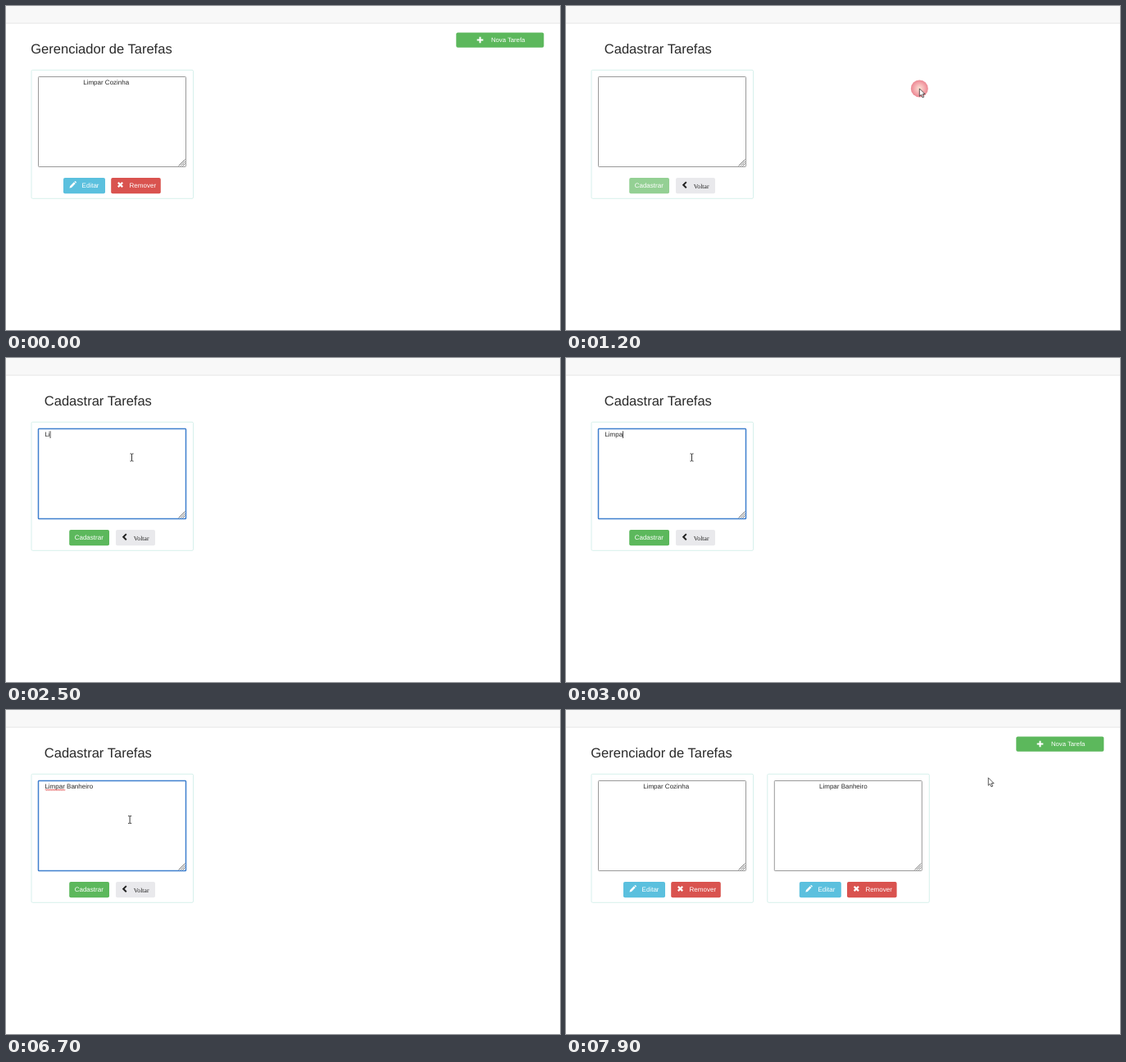
An HTML page that plays this animation: 676 px wide and 396 px high, repeating every 8000 ms.

```html
<!DOCTYPE html>
<html lang="pt">
<head>
<meta charset="utf-8">
<title>Gerenciador de Tarefas</title>
<style>
html, body { margin: 0; width: 100%; height: 100%; overflow: hidden; background: #fff; }
svg { display: block; width: 676px; height: 396px; }
text { font: 8px "Liberation Sans", Arial, sans-serif; fill: #2a2a2a; white-space: pre; text-rendering: geometricPrecision; }
text.title { font-size: 16.55px; }
text.serif { font-family: "Liberation Serif", "Times New Roman", serif; font-size: 7.7px; fill: #222; }
text.light { fill: #fff; }
text.small { font-size: 7.7px; }
</style>
</head>
<body>
<svg id="stage" viewBox="0 0 676 396">
  <defs>
    <radialGradient id="glow">
      <stop offset="0" stop-color="#fce3d4"/>
      <stop offset=".5" stop-color="#f6b4b6"/>
      <stop offset="1" stop-color="#ec8792"/>
    </radialGradient>
    <path id="resizer" d="M210.5 195.5L218.5 187.5M213 195.5L218.5 190M215.5 195.5L218.5 192.5" stroke="#777" stroke-width="1"/>
  </defs>
  <rect width="676" height="396" fill="#fff"/>
  <rect width="676" height="21" fill="#f8f8f8"/>
  <rect y="20.6" width="676" height="1" fill="#e7e7e7"/>
  <g id="list"></g>
  <g id="form"></g>
  <circle id="halo" r="10.5" fill="url(#glow)"/>
  <g id="pointer">
    <path id="arrow" d="M0 0V9.4L2.2 7.4L3.7 11L5.4 10.3L3.9 6.8H6.8Z" fill="#fff" stroke="#222" stroke-width=".75"/>
    <path id="beam" d="M-2-4.5H-.6L0-4L.6-4.5H2M0-4V4M-2 4.5H-.6L0 4L.6 4.5H2" fill="none" stroke="#222" stroke-width=".9"/>
    <path id="hand" d="M-1 0Q0-1.2 1 0V4.2L5.4 5.2Q6.4 5.6 6.2 6.8L5.4 11H.2L-3.4 6.8Q-3.4 5.4-2.2 5.8L-1 7Z" fill="#fff" stroke="#111" stroke-width=".8"/>
  </g>
</svg>
<script>
const LOOP = 8000, STEP = 100;
const TASK = 'Limpar Banheiro';
const TEXT_X = 47.4;
const GREEN = '#5cb85c', GREEN_HOVER = '#449d44';

const FORM_OPEN = 1000, FORM_CLOSE = 7200, FOCUS = 1500;
const PACE = 165, BLINK = 500, CLICK_LENGTH = 300;
const CLICKS = [900, FOCUS, 7000];

// typing bursts: each starts after the letters of the one before
const BURSTS = [{ start: 2300, letters: 7 }, { start: 4700, letters: 8 }];
const SPELL = BURSTS[0].start + 7 * PACE;

// pointer moves, each a curve from the end of the one before
const ENTER = [358, 387];
const MOVES = [
  { from: 0, to: 650, end: [150, 178] },
  { from: 650, to: 900, end: [590, 42] },
  { from: 1000, to: 1490, bend: [372, 146.5], end: [153.5, 121.5] },
  { from: 6600, to: 7000, bend: [149, 160], end: [104, 219] },
  { from: 7200, to: 7900, bend: [213, 325], end: [515.3, 82.8] }
];

const $ = id => document.getElementById(id);
const show = (el, on) => el.setAttribute('visibility', on ? 'visible' : 'hidden');
const clamp = (v, lo, hi) => Math.min(hi, Math.max(lo, v));
const smooth = k => k * k * (3 - 2 * k);

function add(parent, tag, attrs, text) {
  const el = document.createElementNS('http://www.w3.org/2000/svg', tag);
  for (const k in attrs) el.setAttribute(k, attrs[k]);
  if (text) el.textContent = text;
  return parent.appendChild(el);
}
const label = (g, x, y, text, cls = '') => add(g, 'text', { x, y, class: cls }, text);
const stroke = (g, d, color, width) => add(g, 'path', { d, fill: 'none', stroke: color, 'stroke-width': width });
const button = (g, x, y, width, height, fill) => add(g, 'rect', { x, y, width, height, rx: 2, fill });

function box(g) {
  add(g, 'rect', { x: 31, y: 78.3, width: 197.5, height: 157, rx: 1.5, fill: '#fff', stroke: '#d6f0ec' });
  const area = add(g, 'rect', { x: 39.5, y: 86.5, width: 180, height: 110, rx: .8, fill: '#fff' });
  area.setAttribute('stroke', '#999');
  add(g, 'use', { href: '#resizer' });
  return area;
}

function card(g, dx, task) {
  const c = add(g, 'g', { transform: `translate(${dx} 0)` });
  box(c);
  label(c, 94.2, 96.3, task);
  button(c, 70, 210, 51, 19.2, '#5bc0de');
  add(c, 'path', { d: 'M77.5 222.6L78.2 220L82.9 215.3L84.7 217.1L80 221.9ZM83.4 214.8L84.2 214Q85.6 214 86 215.8L85.2 216.6Z', fill: '#fff' });
  label(c, 92.6, 222, 'Editar', 'light');
  button(c, 128.2, 210, 60.6, 19.2, '#d9534f');
  stroke(c, 'M136.8 215.7L142.2 221.1M142.2 215.7L136.8 221.1', '#fff', 2.2);
  label(c, 150.6, 222, 'Remover', 'light');
  return c;
}

const list = $('list'), form = $('form');

label(list, 30.2, 57.7, 'Gerenciador de Tarefas', 'title');
const newTask = button(list, 549.3, 32.4, 107, 18.4, GREEN);
stroke(list, 'M574.7 41.5H582.3M578.5 37.7V45.3', '#fff', 2);
label(list, 592, 44.3, 'Nova Tarefa', 'light small');
card(list, 0, 'Limpar Cozinha');
const second = card(list, 214.8, TASK);

label(form, 46.8, 57.7, 'Cadastrar Tarefas', 'title');
const area = box(form);
const typed = label(form, TEXT_X, 96.3, '');
typed.setAttribute('xml:space', 'preserve');
const squiggle = stroke(form, 'M48 97.6' + 'q.5-1.4 1 0t1 0'.repeat(12), '#e03030', .8);
const caret = add(form, 'rect', { y: 89.3, width: .8, height: 8.7, fill: '#222' });
const saveGroup = add(form, 'g', {});
const save = button(saveGroup, 77.2, 210, 48.8, 19.2, GREEN);
label(saveGroup, 83.7, 222, 'Cadastrar', 'light');
button(form, 134, 210, 48, 19.2, '#e9e9ec');
stroke(form, 'M146.8 215.1L143.2 218.7L146.8 222.3', '#222', 2);
label(form, 155.8, 222.6, 'Voltar', 'serif');

function locate(t) {
  let start = ENTER;
  for (const { from, to, bend, end } of MOVES) {
    if (t < from) break;
    if (t < to) {
      const k = smooth((t - from) / (to - from));
      return start.map((s, i) => {
        const mid = bend ? bend[i] : (s + end[i]) / 2;
        return (1 - k) ** 2 * s + 2 * k * (1 - k) * mid + k * k * end[i];
      });
    }
    start = end;
  }
  return start;
}

function typing(t) {
  let count = 0, last = FOCUS;
  for (const { start, letters } of BURSTS) {
    const n = clamp(Math.floor((t - start) / PACE) + 1, 0, letters);
    if (n) last = start + (n - 1) * PACE;
    count += n;
  }
  return { count, caretOn: t >= FOCUS && Math.floor((t - last) / BLINK) % 2 === 0 };
}

function drawPointer(t, onForm) {
  const seen = t > 0;
  const [x, y] = locate(t);
  const inside = (l, top, r, b) => x > l && x < r && y > top && y < b;
  const onNew = seen && !onForm && inside(549, 32, 657, 51);
  const onSave = onForm && inside(77, 210, 126, 229);
  const kind = inside(39, 86, 220, 197) ? 'beam' : onNew || onSave ? 'hand' : 'arrow';
  for (const id of ['arrow', 'beam', 'hand']) show($(id), seen && id === kind);
  $('pointer').setAttribute('transform', `translate(${x} ${y})`);
  newTask.setAttribute('fill', onNew ? GREEN_HOVER : GREEN);
  save.setAttribute('fill', onSave ? GREEN_HOVER : GREEN);

  const halo = $('halo');
  show(halo, CLICKS.some(c => t >= c && t <= c + CLICK_LENGTH));
  halo.setAttribute('cx', x);
  halo.setAttribute('cy', y);
}

function draw(t) {
  const onForm = t >= FORM_OPEN && t < FORM_CLOSE;
  list.style.display = onForm ? 'none' : '';
  form.style.display = onForm ? '' : 'none';
  second.style.display = t >= FORM_CLOSE ? '' : 'none';

  if (onForm) {
    const { count, caretOn } = typing(t);
    const focused = t >= FOCUS;
    typed.textContent = TASK.slice(0, count);
    caret.setAttribute('x', TEXT_X + (count ? typed.getComputedTextLength() : 0));
    show(caret, caretOn);
    show(squiggle, t >= SPELL);
    area.setAttribute('stroke', focused ? '#3f7fce' : '#999');
    area.setAttribute('stroke-width', focused ? 1.5 : 1);
    saveGroup.setAttribute('opacity', count ? 1 : .65);
  }
  drawPointer(t, onForm);
}

const start = performance.now();
function tick() {
  const t = (performance.now() - start + 8) % LOOP;
  draw(Math.floor(t / STEP) * STEP);
  requestAnimationFrame(tick);
}
tick();
</script>
</body>
</html>
```
